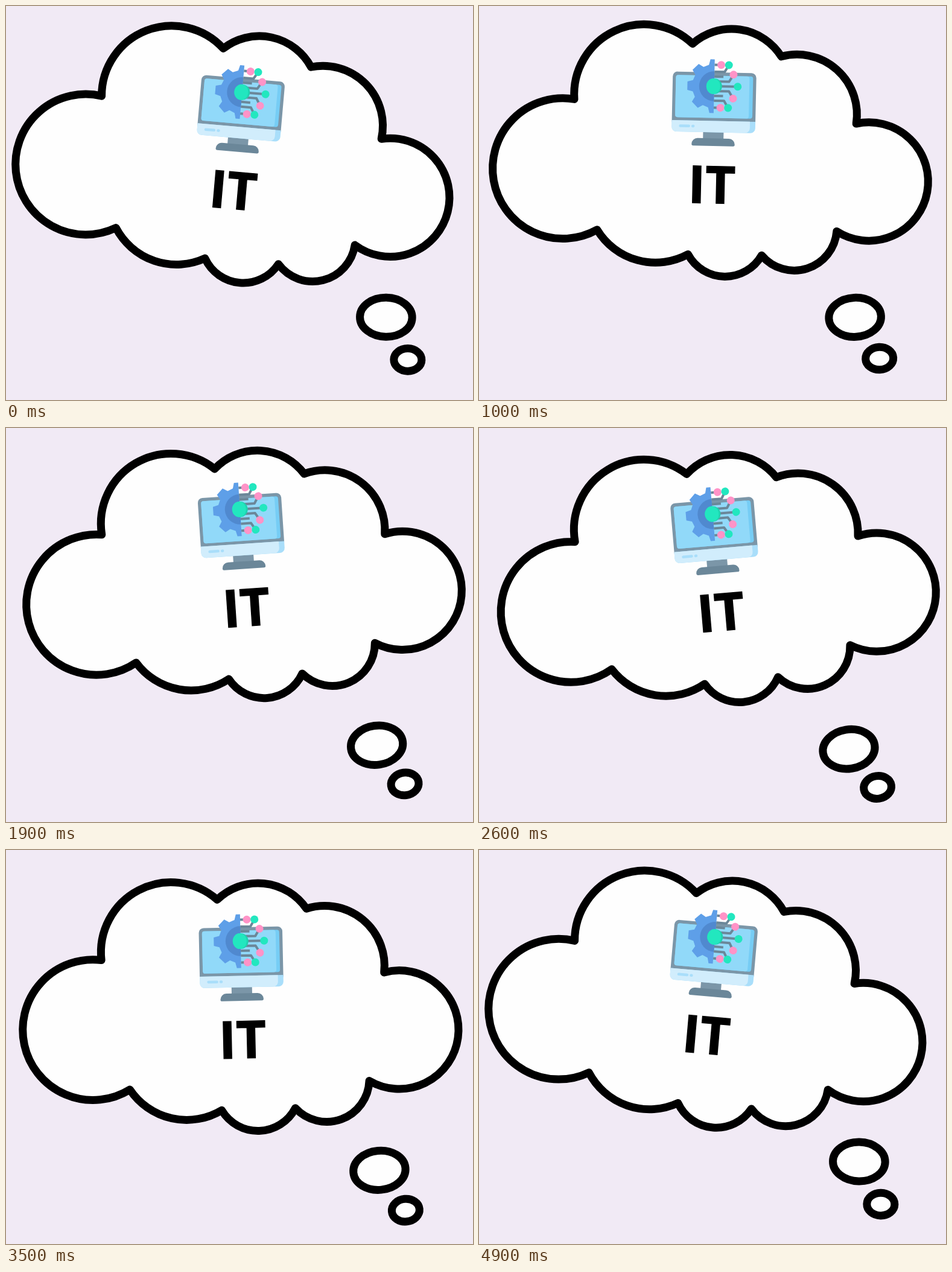
Animation, 774 px wide and 653 px high, one loop 5 s. Source, as an HTML page with a canvas:

```html
<!DOCTYPE html>
<html lang="en">
<head>
<meta charset="utf-8">
<title>Thought cloud</title>
<style>
html, body { margin: 0; width: 100%; height: 100%; overflow: hidden; background: #f1eaf5; }
canvas { display: block; }
</style>
</head>
<body>
<canvas id="stage" width="774" height="653"></canvas>
<script>
const ctx = document.getElementById('stage').getContext('2d');
const LOOP = 5000, STEP = 100, TAU = Math.PI * 2, DEG = Math.PI / 180;
const INK = '#000', PAPER = '#fefefe', STEEL = '#7b96a8', SLATE = '#6b8799';
const PINK = '#ff93c7', MINT = '#22e7bf', ICE = '#a9defa';
const AXIS = 389.6, HUB_Y = 142, NODE = 6.5;

// Notches clockwise: x, y and how far the lobe after it bulges, in half chords.
const cloud = makeCloud([
  [158, 168.5, 0.685], [352, 72.5, 0.465], [499.5, 90.5, 0.543], [626, 199, 1.5],
  [597.5, 378, 0.67], [474, 420.5, 0.59], [352, 421.5, 0.4], [200.5, 384, 1.41]
]);
const gear = makeGear();

function makeCloud(notches) {
  let d = `M${notches[0][0]} ${notches[0][1]}`;
  notches.forEach(([x, y, bulge], i) => {
    const [nx, ny] = notches[(i + 1) % notches.length];
    const r = Math.hypot(nx - x, ny - y) * (1 + bulge * bulge) / (4 * bulge);
    d += `A${r} ${r} 0 ${bulge > 1 ? 1 : 0} 1 ${nx} ${ny}`;
  });
  return new Path2D(d + 'Z');
}

// Left half of an eight-toothed wheel around the origin.
function makeGear() {
  const path = new Path2D();
  for (let tooth = 0; tooth < 5; tooth++) {
    for (let corner = 0; corner < 4; corner++) {
      const tip = corner === 1 || corner === 2;
      const half = (tip ? 9 : 15) * (corner < 2 ? 1 : -1);
      const a = (half - 90 - 45 * tooth) * DEG, r = tip ? 45 : 36.5;
      path.lineTo(r * Math.cos(a), r * Math.sin(a));
    }
  }
  path.closePath();
  return path;
}

function outline(path) {
  ctx.fillStyle = PAPER;
  ctx.strokeStyle = INK;
  ctx.lineWidth = 13;
  ctx.lineJoin = 'round';
  ctx.fill(path);
  ctx.stroke(path);
}

function bubble(x, y, rx, ry) {
  const path = new Path2D();
  path.ellipse(x, y, rx, ry, -4 * DEG, 0, TAU);
  outline(path);
}

function disc(x, y, r, color, rx = r) {
  ctx.fillStyle = color;
  ctx.beginPath();
  ctx.ellipse(x, y, rx, r, 0, 0, TAU);
  ctx.fill();
}

// A box centred on the monitor's axis, or moved sideways by dx.
function slab(w, y, h, radius, color, dx = 0) {
  ctx.fillStyle = color;
  ctx.beginPath();
  ctx.roundRect(AXIS + dx - w / 2, y, w, h, radius);
  ctx.fill();
}

// A panel with a darker strip along its right side.
function shaded(w, y, h, radius, light, dark, strip) {
  slab(w, y, h, radius, dark);
  slab(w - strip, y, h, radius, light, -strip / 2);
}

function swing(px, py, angle, lift, draw) {
  ctx.save();
  ctx.translate(px, py + lift);
  ctx.rotate(angle);
  ctx.translate(-px, -py);
  draw();
  ctx.restore();
}

function drawMonitor() {
  slab(34, 216, 15, 0, STEEL);
  slab(71.5, 228.5, 12.5, [11, 11, 3, 3], SLATE);
  slab(138.5, 119, 90, 8, STEEL);
  shaded(128, 124.5, 70, 4, '#91d9f9', '#76cdf5', 6);
  shaded(138.5, 199.5, 19, [0, 0, 8, 8], '#d1edfc', ICE, 9);
  slab(18.5, 206.5, 4.5, 2.2, ICE, -48);
  slab(5.5, 206.5, 4.5, 2.2, ICE, -34);
}

// A wire leaves the hub at height y and bends towards its node.
function wire(y, nodeX, nodeY, color) {
  ctx.beginPath();
  ctx.moveTo(0, y);
  ctx.lineTo(nodeX - 0.6 * Math.abs(nodeY - y), y);
  ctx.lineTo(nodeX, nodeY);
  ctx.stroke();
  if (color) disc(nodeX, nodeY, NODE, color);
}

function drawGear() {
  ctx.save();
  ctx.translate(AXIS - 0.3, HUB_Y);

  ctx.save();
  ctx.beginPath();
  ctx.rect(-50, -50, 50, 100);
  ctx.clip();
  ctx.fillStyle = '#5e9fe8';
  ctx.fill(gear);
  disc(0, 0, 25, '#5089cf');
  ctx.restore();

  ctx.strokeStyle = SLATE;
  ctx.lineWidth = 4;
  for (const side of [-1, 1]) {
    wire(35.5 * side, 11, 35.5 * side, PINK);
    wire(24 * side, 23.7, 35.5 * side, MINT);
    wire(16 * side, 15, 16 * side);
    wire(8 * side, 31.7, 19.8 * side, PINK);
  }
  wire(0, 39, 0, MINT);
  disc(0, 0, 13, '#1fd3b0');
  disc(-1.5, 0, 13, MINT, 11.5);
  ctx.restore();
}

function drawLabel() {
  ctx.fillStyle = ctx.strokeStyle = INK;
  ctx.font = 'bold 86px "Open Sans", sans-serif';
  ctx.lineWidth = 1.4;
  ctx.lineJoin = 'miter';
  ctx.fillText('IT', 349.8, 336);
  ctx.strokeText('IT', 349.8, 336);
}

function drawCloud() {
  outline(cloud);
  drawMonitor();
  drawGear();
  drawLabel();
}

function drawBubbles() {
  bubble(621, 523.3, 43.3, 32.5);
  bubble(663, 590.5, 23, 18.8);
}

function render(now) {
  const t = Math.floor((now % LOOP) / STEP) * STEP;
  const angle = 5 * DEG * Math.cos(TAU * (t + 50) / LOOP);
  const bob = -Math.sin(TAU * (t - 50) / LOOP);
  ctx.fillStyle = '#f1eaf5';
  ctx.fillRect(0, 0, 774, 653);
  swing(387, 165, angle, 9.8 * bob, drawCloud);
  swing(716, 621, angle, 5.8 * bob, drawBubbles);
}

let start;
function tick(now) {
  start ??= now;
  render(now - start);
  requestAnimationFrame(tick);
}
render(0);
requestAnimationFrame(tick);
</script>
</body>
</html>
```
